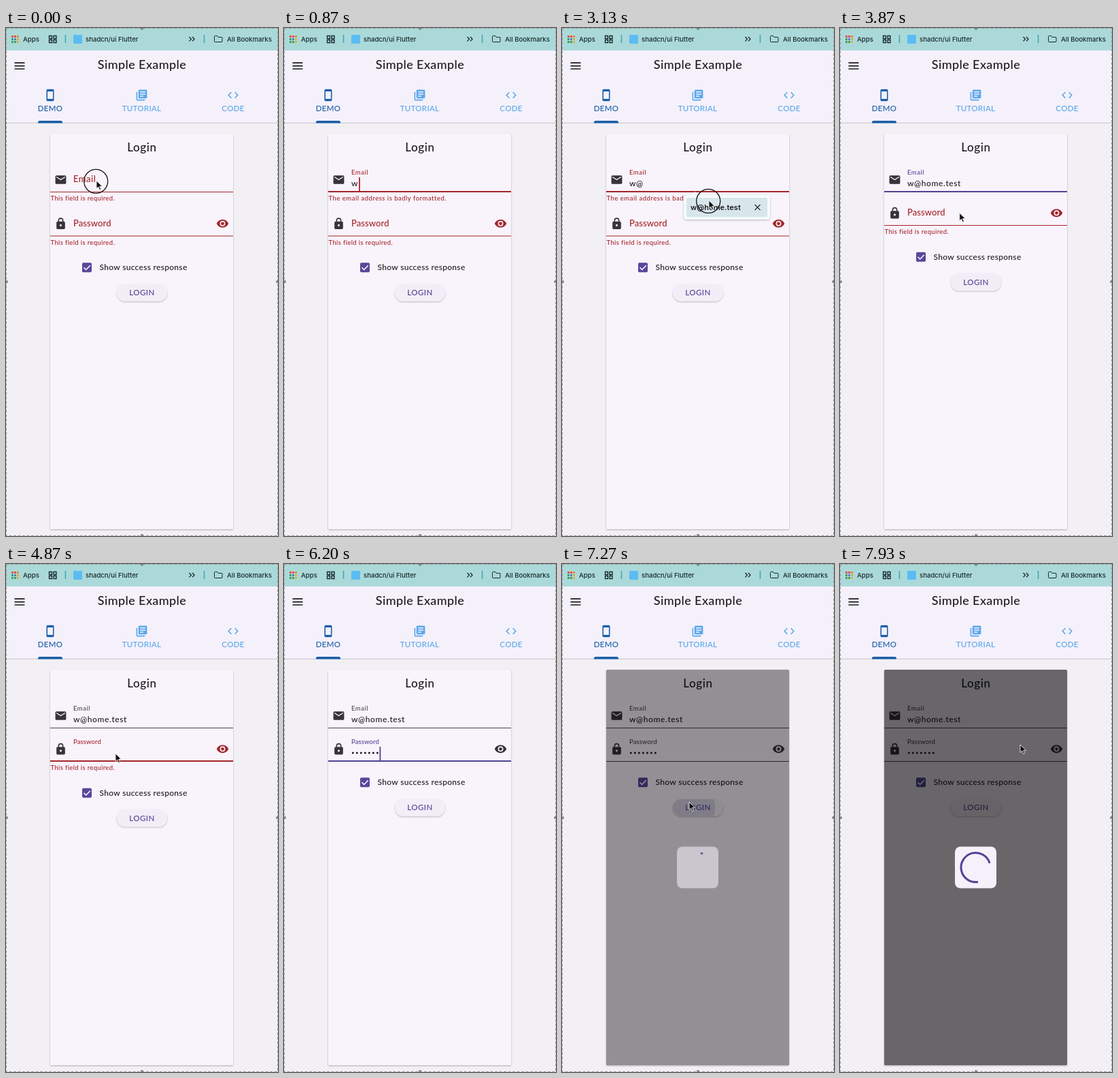
Recreate the animation shown at these times as an HTML page. Size 400 by 745 pixels, loop 8 s.

```html
<!DOCTYPE html>
<html lang="en">
<head>
<meta charset="utf-8">
<title>Login form demo</title>
<style>
  html, body { margin: 0; width: 100%; height: 100%; overflow: hidden; background: #f2f0f4; }
  svg { display: block; width: 100%; height: 100%; }
  text { font-family: Lato, sans-serif; font-weight: 500; fill: #1d1b20; white-space: pre; }
  .bar { font: 500 9.6px Inter, sans-serif; fill: #17282a; }
  .mid { text-anchor: middle; }
  .tab { font-size: 11.5px; letter-spacing: .3px; }
  .help { font-size: 9.5px; fill: #a3262a; }
  .line { fill: none; stroke: #17282a; stroke-width: 1.3; }
  .icon { fill-rule: evenodd; }
</style>
</head>
<body>
<svg id="stage" viewBox="0 0 400 745" xmlns="http://www.w3.org/2000/svg"></svg>
<script>
const LOOP = 8000, EMAIL = 'w@home.test';
const RED = '#a3262a', PRIMARY = '#4f4496', DARK = '#37333b', BLUE = '#1a5fa8', SKY = '#5ba8ea';
const ICONS = {
  phone: 'M7 1h10q2 0 2 2v18q0 2-2 2H7q-2 0-2-2V3q0-2 2-2zM7 5v14h10V5z',
  books: 'M2 6h2v14h14v2H4q-2 0-2-2zM8 2h12q2 0 2 2v12q0 2-2 2H8q-2 0-2-2V4q0-2 2-2zM9 5v2h10V5zM9 9v2h10V9zM9 13v2h6v-2z',
  code: 'M9.4 16.6 4.8 12l4.6-4.6L8 6l-6 6 6 6zM14.6 16.6l4.6-4.6-4.6-4.6L16 6l6 6-6 6z',
  mail: 'M4 4h16q2 0 2 2v12q0 2-2 2H4q-2 0-2-2V6q0-2 2-2zM4 6v2l8 5 8-5V6l-8 5z',
  lock: 'M6 8h1V6a5 5 0 0 1 10 0v2h1q2 0 2 2v10q0 2-2 2H6q-2 0-2-2V10q0-2 2-2zM9 8h6V6a3 3 0 0 0-6 0zM12 13a2 2 0 0 0 0 4a2 2 0 0 0 0-4z',
  eye: 'M1 12C5 2 19 2 23 12C19 22 5 22 1 12zM12 7a5 5 0 0 0 0 10a5 5 0 0 0 0-10zM12 9a3 3 0 0 0 0 6a3 3 0 0 0 0-6z'
};
const icon = (name, x, y, fill, id = '') =>
  `<path ${id && `id="${id}"`} class="icon" d="${ICONS[name]}" fill="${fill}" transform="translate(${x} ${y}) scale(.79) translate(-12 -12)"/>`;

const tab = (name, label, x, color) =>
  icon(name, x, 98.5, color) + `<text class="tab mid" x="${x}" y="121.6" style="fill:${color}">${label}</text>`;

// Coordinates inside a field are relative to the bottom of its underline.
const field = (id, label, content) => `
  <g id="${id}">
    <text id="${id}Label" x="99">${label}</text>
    ${content}
    <rect id="${id}Caret" y="-22" width="1.8" height="20"/>
    <rect id="${id}Line" x="65" width="269"/>
    <text id="${id}Help" class="help" x="65.5" y="12"></text>
  </g>`;

const appColors = ['#e5483b', '#e5483b', '#ef7d32', '#3b9b57', '#4280e8', '#e9ab2d', '#3b9b57', '#3b9b57', '#e9ab2d'];
const appDots = appColors.map((c, i) =>
  `<rect x="${8 + i % 3 * 4}" y="${11 + Math.floor(i / 3) * 4}" width="3" height="3" rx=".8" fill="${c}"/>`).join('');
const passwordDots = Array.from({ length: 7 }, (_, i) =>
  `<circle cx="${101.3 + 6 * i}" cy="-13" r="1.5" fill="#1d1b20"/>`).join('');
const handles = [[200, 1], [200, 744], [1, 372], [399, 372]].map(([x, y]) =>
  `<circle cx="${x}" cy="${y}" r="2" fill="#858388"/>`).join('');

document.getElementById('stage').innerHTML = `
  <defs>
    <filter id="shadow" x="-20%" y="-20%" width="140%" height="150%">
      <feDropShadow dx="0" dy="1" stdDeviation="1.3" flood-opacity=".28"/>
    </filter>
    <clipPath id="pill"><rect x="163" y="-12.5" width="74" height="25" rx="12.5"/></clipPath>
  </defs>
  <rect width="400" height="745" fill="#f2f0f4"/>
  <rect width="400" height="139" fill="#f5f1fb"/>
  <rect width="400" height="33" fill="#abd9d9"/>
  ${appDots}
  <text class="bar" x="25" y="19.5">Apps</text>
  <path class="line" d="M63.5 11.5h4v4h-4zM70 11.5h4v4h-4zM63.5 17.5h4v4h-4zM70 17.5h4v4h-4z"/>
  <path d="M87.5 10v12M291.5 10v12" stroke="#43aab3" stroke-width="1.6"/>
  <rect x="99" y="10" width="13" height="13" rx="1" fill="#5bbcf3"/>
  <text class="bar" x="117" y="19.5">shadcn/ui Flutter</text>
  <path class="line" d="M269.5 13l3 3.2-3 3.2M274 13l3 3.2-3 3.2"/>
  <path class="line" style="stroke-width:1" d="M306.5 12.5q0-1 1-1h3l1.5 2h5q1 0 1 1v5q0 1-1 1h-9.5q-1 0-1-1z"/>
  <text class="bar" x="325" y="19.5">All Bookmarks</text>

  <path d="M12.5 51.2h15M12.5 55.6h15M12.5 60h15" stroke="#1d1b20" stroke-width="1.7"/>
  <text class="mid" x="200" y="60" font-size="18" letter-spacing=".4">Simple Example</text>
  ${tab('phone', 'DEMO', 65, BLUE)}${tab('books', 'TUTORIAL', 199.5, SKY)}${tab('code', 'CODE', 334, SKY)}
  <rect y="138.7" width="400" height="1" fill="#c8c4cc"/>
  <path d="M47 139.5v-1q0-2.5 2.5-2.5h31q2.5 0 2.5 2.5v1z" fill="${BLUE}"/>

  <rect x="65" y="155" width="269" height="580" rx="1.5" fill="#f9f3fc" filter="url(#shadow)"/>
  <text class="mid" x="200" y="181" font-size="17" letter-spacing=".6">Login</text>
  ${field('email', 'Email', icon('mail', 80.5, -18.5, DARK) +
    '<text id="emailText" x="99" y="-8.7" font-size="12" letter-spacing=".6"></text>')}
  ${field('pass', 'Password', icon('lock', 80.5, -18.5, DARK) + icon('eye', 318.5, -18.7, DARK, 'eye') +
    `<g id="dots">${passwordDots}</g>`)}
  <g id="check">
    <rect x="112" y="-7" width="14" height="14" rx="1.8" fill="#57489b"/>
    <path d="M114.5 0l3.2 3.2 6-6.2" fill="none" stroke="#fff" stroke-width="1.5"/>
    <text x="137.5" y="4" font-size="12" letter-spacing=".3">Show success response</text>
  </g>
  <g id="button">
    <rect x="163" y="-12.5" width="74" height="25" rx="12.5" fill="#f3edf7" filter="url(#shadow)"/>
    <circle id="ripple" cx="188" cy="0" fill="${PRIMARY}" clip-path="url(#pill)"/>
    <text class="mid" x="200" y="4" font-size="11.5" letter-spacing=".5" style="fill:${PRIMARY}">LOGIN</text>
  </g>
  <rect id="barrier" x="65" y="155" width="269" height="580" rx="1.5"/>
  <g id="dialog">
    <rect x="169" y="414.5" width="61" height="61" rx="8" fill="#f6f0fa"/>
    <path id="spinner" fill="none" stroke="${PRIMARY}" stroke-width="3"/>
  </g>
  <g id="popup">
    <path d="M184 245h6.5l5-5 5 5H301q5 0 5 5v26q0 5-5 5H184q-5 0-5-5v-26q0-5 5-5z" fill="#f3fbfd" filter="url(#shadow)"/>
    <g id="hover">
      <rect x="183" y="249" width="119" height="28" rx="2" fill="#d7e6ea"/>
      <path class="line" style="stroke-width:1.1" d="M283.5 259l8 8M291.5 259l-8 8"/>
    </g>
    <text x="189" y="267" style="font:600 11px Inter,sans-serif">${EMAIL}</text>
  </g>
  <g id="cursor">
    <circle id="press" cx="-.8" cy=".8" r="17.5" fill="none" stroke="#111" stroke-width="1.3"/>
    <path d="M0 0v11.5l2.7-2.5 2 4.5 2-.9-2-4.3h3.8z" fill="#111" stroke="#fff" stroke-width=".8"/>
  </g>
  <rect x=".5" y=".5" width="399" height="744" fill="none" stroke="#99979d" stroke-dasharray="4 2.5"/>
  ${handles}`;

const el = {};
document.querySelectorAll('#stage [id]').forEach(node => el[node.id] = node);
const set = (id, attrs) => { for (const k in attrs) el[id].setAttribute(k, attrs[k]); };
const show = (id, on) => set(id, { visibility: on ? 'inherit' : 'hidden' });
const place = (id, x, y) => set(id, { transform: `translate(${x} ${y})` });
const clamp = x => Math.max(0, Math.min(1, x));
const smooth = x => { x = clamp(x); return x * x * (3 - 2 * x); };
const ramp = (t, start, length) => smooth((t - start) / length);
const within = (t, spans) => spans.some(([a, b]) => t >= a && t < b);

const cursorPath = [[0, 133, 224], [1950, 133, 224], [2700, 216, 253], [3330, 216, 253], [4150, 161, 278],
  [6300, 161, 278], [6850, 187, 349], [7450, 187, 349], [7930, 265, 265], [LOOP, 265, 265]];
const cursorShown = [[0, 800], [1950, 5150], [6300, LOOP]];
const presses = [[0, 200], [3050, 3300], [4250, 4450], [6950, 7180]];

function cursorAt(t) {
  const i = cursorPath.findIndex(p => p[0] > t);
  const [t0, x0, y0] = cursorPath[i - 1], [t1, x1, y1] = cursorPath[i];
  const k = ramp(t, t0, t1 - t0);
  return [x0 + (x1 - x0) * k, y0 + (y1 - y0) * k];
}

function drawField(id, y, s) {
  const color = s.error ? RED : s.focused ? PRIMARY : '#49454f';
  const height = s.focused ? 2 : 1;
  place(id, 0, y);
  set(id + 'Label', {
    y: -15 - 11 * s.float, 'font-size': 13 - 3.5 * s.float,
    'letter-spacing': id === 'email' ? .5 : .1, style: `fill:${color}`
  });
  set(id + 'Caret', { x: s.caretX, fill: color });
  show(id + 'Caret', s.caret);
  set(id + 'Line', { y: -height, height, fill: color });
  el[id + 'Help'].textContent = s.error;
  set(id + 'Help', { 'letter-spacing': s.error.startsWith('The') ? .5 : .35 });
}

// Material indeterminate progress arc.
function spinnerPath(T) {
  const cycle = T / 1333 % 1, ease = x => smooth(Math.pow(clamp(x), .85));
  const head = ease(cycle * 2), tail = ease(cycle * 2 - 1);
  const start = -Math.PI / 2 + Math.PI * (1.5 * tail + 2 * T / 2222 + .5 * cycle);
  const sweep = Math.max(1.5 * Math.PI * (head - tail), .03);
  const point = a => `${199.5 + 21.5 * Math.cos(a)} ${445 + 21.5 * Math.sin(a)}`;
  return `M${point(start)}A21.5 21.5 0 ${sweep > Math.PI ? 1 : 0} 1 ${point(start + sweep)}`;
}

function render(t) {
  const REQUIRED = 'This field is required.';
  const blink = since => Math.floor((t - since) / 500) % 2 === 0;

  const emailFocus = t >= 130 && t < 4330;
  const typed = t < 800 ? '' : t < 1200 ? EMAIL[0] : t < 3300 ? EMAIL.slice(0, 2) : EMAIL;
  el.emailText.textContent = typed;
  drawField('email', 241, {
    focused: emailFocus, float: ramp(t, 130, 170),
    error: t < 800 ? REQUIRED : t < 3300 ? 'The email address is badly formatted.' : '',
    caret: emailFocus && blink(t < 800 ? 130 : t < 1200 ? 800 : t < 3300 ? 1200 : 3300),
    caretX: 100 + (typed ? el.emailText.getComputedTextLength() : 0)
  });

  const count = t < 5150 ? 0 : Math.min(7, 1 + Math.floor((t - 5150) / 125));
  const passFocus = t >= 4330 && t < 6950;
  const passY = 305.5 - 15.5 * ramp(t, 3300, 170);
  drawField('pass', passY, {
    focused: passFocus, float: ramp(t, 4330, 170), error: count ? '' : REQUIRED,
    caret: passFocus && blink(count ? 5025 + 125 * count : 4330), caretX: 98.5 + 6 * count
  });
  [...el.dots.children].forEach((dot, i) => dot.setAttribute('visibility', i < count ? 'visible' : 'hidden'));
  set('eye', { fill: count ? DARK : RED });

  const lowerY = passY - 15.5 * ramp(t, 5150, 170);
  place('check', 0, lowerY + 45.8);
  place('button', 0, lowerY + 82.8);

  const wait = Math.max(0, t - 7220), fade = clamp(wait / 150);
  set('ripple', { r: 8 + Math.max(0, t - 6980) * .1, opacity: t < 6980 ? 0 : .16 * (1 - ramp(t, 7280, 250)) });
  set('barrier', { opacity: .58 * (1 - Math.pow(1 - fade, 3)) });
  set('dialog', { opacity: 1 - Math.pow(1 - fade, 2) });
  set('spinner', { d: spinnerPath(wait) });

  show('popup', t >= 1000 && t < 3300);
  show('hover', t >= 2550 && t < 3300);
  place('cursor', ...cursorAt(t));
  show('cursor', within(t, cursorShown));
  show('press', within(t, presses));
}

const begin = performance.now();
function frame() {
  render((performance.now() - begin) % LOOP);
  requestAnimationFrame(frame);
}
frame();
</script>
</body>
</html>
```
